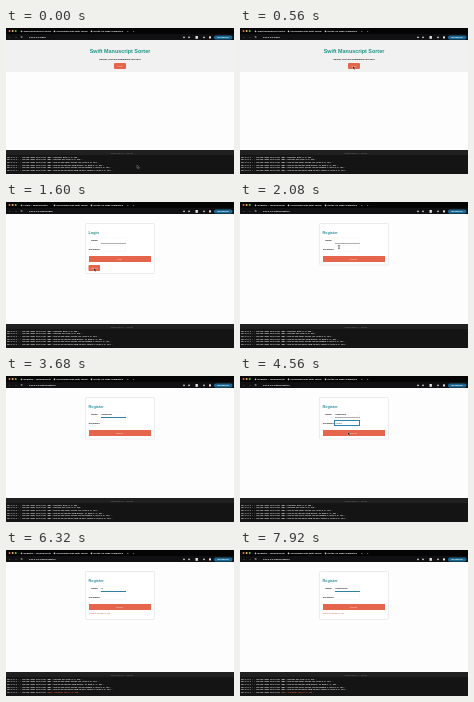
An HTML page that plays this animation: 228 px wide and 146 px high, repeating every 8 s.

```html
<!DOCTYPE html>
<html lang="en">
<head>
<meta charset="utf-8">
<title>Register walkthrough</title>
<style>
  html, body { margin: 0; width: 100%; height: 100%; overflow: hidden; background: #fff; }
  svg { display: block; width: 100vw; height: 100vh; font-family: "Liberation Sans", Arial, sans-serif; }
  .mono { font: bold 1.8px "Liberation Mono", monospace; fill: #fff; white-space: pre; }
  .tab { font-size: 2.5px; font-weight: bold; fill: #fff; }
  .title { font-weight: bold; fill: #1c9384; }
  .body { font-size: 2.3px; font-weight: bold; fill: #111; }
  .btn { fill: #e4644c; }
  .on { font-size: 2px; fill: #fbd9d1; text-anchor: middle; }
  .box { fill: #fff; stroke: #f0f0f0; stroke-width: .4; }
  .focus { fill: none; stroke: #2f83b0; }
  .off { display: none; }
</style>
</head>
<body>
<svg viewBox="0 0 228 146" preserveAspectRatio="none">
  <rect width="228" height="146" fill="#fdfdfd"/>

  <g id="home">
    <rect y="12" width="228" height="32" fill="#f1f1f1"/>
    <text class="title" x="114" y="24.8" font-size="5.4" text-anchor="middle">Swift Manuscript Sorter</text>
    <text class="body" x="114" y="32" text-anchor="middle">Upload, sort and summarize your files</text>
    <rect class="btn" x="108" y="35" width="12" height="6" rx="1"/>
    <text class="on" x="114" y="38.7">Login</text>
  </g>

  <g id="form">
    <rect id="card" x="79.5" y="21.5" width="69" rx="1" fill="#fff" stroke="#e4e4e4" stroke-width=".7"/>
    <text id="heading" class="title" x="82.6" y="31.6" font-size="3.8"></text>
    <text class="body" x="85.3" y="39.4">Name:</text>
    <text class="body" x="82.8" y="47.6">Password</text>
    <rect class="box" x="94.6" y="36" width="25" height="5.2"/>
    <path id="nameLine" d="M95 41.5H120"/>
    <rect class="box" x="94.6" y="44" width="24.6" height="5.2"/>
    <rect id="passFocus" class="focus" x="94.5" y="44.5" width="25" height="5"/>
    <text id="name" class="body" x="95.6" y="39.4"></text>
    <text id="pass" class="body" x="95.6" y="47.8"></text>
    <rect class="btn" x="83" y="54" width="62" height="6"/>
    <text id="submitText" class="on" x="113.5" y="57.7"></text>
    <g id="signup">
      <rect class="btn" x="82.5" y="63" width="11.5" height="6" rx=".8"/>
      <text class="on" x="88.2" y="66.7">Register</text>
    </g>
    <text id="error" x="83" y="64.3" font-size="2.1" fill="#c4574d">Name is already in use</text>
  </g>

  <rect width="228" height="12" fill="#101012"/>
  <rect width="228" height="6" fill="#040404"/>
  <circle cx="3.5" cy="3" r="1" fill="#ec6a5e"/>
  <circle cx="6.6" cy="3" r="1" fill="#f4bf4f"/>
  <circle cx="9.7" cy="3" r="1" fill="#61c554"/>
  <circle cx="15.5" cy="3.4" r=".8" fill="#b9c4cb"/>
  <text id="tab" class="tab" x="17.5" y="4.2"></text>
  <circle cx="48.5" cy="3.4" r=".8" fill="#ddd"/>
  <text class="tab" x="50.5" y="4.2">Uploading files with forms</text>
  <circle cx="85.5" cy="3.4" r=".8" fill="#ddd"/>
  <text class="tab" x="87.5" y="4.2">Notes on page templates</text>
  <text class="tab" x="121" y="4.2">×</text>
  <text class="tab" x="127" y="4.2">+</text>
  <text class="tab" x="2.5" y="10.2">←</text>
  <text class="tab" x="8.5" y="10.2">→</text>
  <text class="tab" x="14.5" y="10.2">↻</text>
  <text id="url" class="tab" x="23" y="10.3"></text>
  <g fill="#e4e4e4">
    <circle cx="178" cy="9.4" r=".8"/>
    <circle cx="183" cy="9.4" r=".8"/>
    <rect x="189.5" y="8" width="2.4" height="2.8"/>
    <circle cx="198" cy="9.4" r=".8"/>
    <rect x="203" y="8.4" width="2" height="2"/>
  </g>
  <rect x="208" y="7.6" width="18.5" height="3.8" rx="1.9" fill="#1b6a96"/>
  <text class="tab" x="217.2" y="10.3" text-anchor="middle">Relaunch</text>

  <rect y="122" width="228" height="24" fill="#141414"/>
  <rect y="122" width="228" height="5" fill="#202020"/>
  <text x="116" y="125.6" font-size="2" fill="#777" text-anchor="middle">python app.py — 120×24</text>
  <g id="log"></g>

  <path id="arrow" d="M0 0V3.3L.8 2.6L1.4 3.8L1.9 3.5L1.4 2.4H2.4Z" fill="#000" stroke="#fff" stroke-width=".25"/>
  <path id="beam" d="M-.6 -1.6H.6M0 -1.6V1.6M-.6 1.6H.6" fill="none" stroke="#111" stroke-width=".6"/>
</svg>
<script>
const LOOP = 8000, STEP = 80;
const LOGIN = 720, REGISTER = 1840, PASSWORD = 3920, SENT = 5120, RETRY = 5760, CLEARED = 6320;
const $ = id => document.getElementById(id);
const show = (id, on) => $(id).classList.toggle("off", !on);
const fit = v => Math.max(0, Math.min(1, v));
const typed = (text, t, start, end) => text.slice(0, Math.ceil(text.length * fit((t - start) / (end - start))));

const requests = [
  "GET /register HTTP/1.1\" 200",
  "GET /favicon.ico HTTP/1.1\" 200",
  "GET /static/css/home-styles.css HTTP/1.1\" 304",
  "GET /static/js/upload-form-helper.js HTTP/1.1\" 304",
  "GET /static/css/form-styles.css?version=2.0 HTTP/1.1\" 304",
  "GET /static/js/validate-form-helper.js?v=2.0 HTTP/1.1\" 304",
  "POST /register HTTP/1.1\" 400"
];

// time, x, y
const path = [
  [0, 131, 137], [80, 131, 137], [560, 113, 38], [720, 113, 38], [880, 111, 38],
  [960, 111, 38], [1520, 88, 66], [1840, 88, 66], [2080, 99, 45], [2480, 108, 38],
  [3920, 108, 38], [4480, 108, 56], [5120, 108, 56], [5440, 104, 50.5], [5840, 103, 38],
  [LOOP, 103, 38]
];

function cursorAt(t) {
  const i = path.findIndex(p => p[0] > t);
  const [a, x, y] = path[i - 1], [b, u, v] = path[i];
  let k = (t - a) / (b - a);
  k = k * k * (3 - 2 * k);
  return [x + (u - x) * k, y + (v - y) * k];
}

const svgNode = (tag, parent) =>
  parent.appendChild(document.createElementNS("http://www.w3.org/2000/svg", tag));

const rows = requests.map((request, i) => {
  const row = svgNode("text", $("log"));
  row.setAttribute("class", "mono");
  row.setAttribute("x", 1);
  const stamp = svgNode("tspan", row);
  stamp.textContent = `127.0.0.1 - - [12/Mar/2024 10:21:${31 + i}] `;
  const call = svgNode("tspan", row);
  call.textContent = `"${request} -`;
  if (request.startsWith("POST")) call.style.fill = "#e8603a";
  return row;
});

function nameText(t) {
  if (t < 2720) return "";
  if (t < CLEARED) return typed("newuser1", t, 2640, 3680);
  if (t < 7040) return "n";
  return "n" + typed("ewuser12", t, 6960, 7760);
}

function render(t) {
  const home = t < LOGIN, login = !home && t < REGISTER, sent = t >= SENT;
  show("home", home);
  show("form", !home);
  show("signup", login);
  show("error", sent);

  const word = login ? "Login" : "Register";
  $("heading").textContent = word;
  $("heading").style.fill = login ? "#1c9384" : "#2b8c9a";
  $("submitText").textContent = word;
  $("card").setAttribute("height", login ? 50 : sent ? 48 : 41.5);
  $("tab").textContent = home ? "Swift Manuscript Sorter" : word + " – Manuscripts";
  $("url").textContent = "127.0.0.1:5000" + (home ? "" : "/" + word.toLowerCase());

  const inPass = t >= PASSWORD && t < RETRY;
  const inName = t >= 2560 && !inPass;
  show("passFocus", inPass);
  $("nameLine").style.stroke = inName ? "#2f7f9f" : "#b0b0b0";
  $("name").textContent = nameText(t);
  $("pass").textContent = t >= 4000 && !sent ? typed("••••••••", t, 3920, 4480) : "";

  const [x, y] = cursorAt(t);
  const hidden = (t >= 2720 && t < 4080) || t >= 6080;
  const overField = (t >= LOGIN && t < 1120) || (t >= 2000 && t < 4320) || t >= 5360;
  show("beam", !hidden && overField);
  show("arrow", !hidden && !overField);
  for (const id of ["beam", "arrow"]) $(id).setAttribute("transform", `translate(${x} ${y})`);

  const first = sent ? 1 : 0;
  rows.forEach((row, i) => {
    row.classList.toggle("off", i < first || i >= first + 6);
    row.setAttribute("y", 129.7 + (i - first) * 2.65);
  });
}

const begin = performance.now();
function tick() {
  const t = (performance.now() - begin) % LOOP;
  render(Math.floor(t / STEP) * STEP);
  requestAnimationFrame(tick);
}
tick();
</script>
</body>
</html>
```
